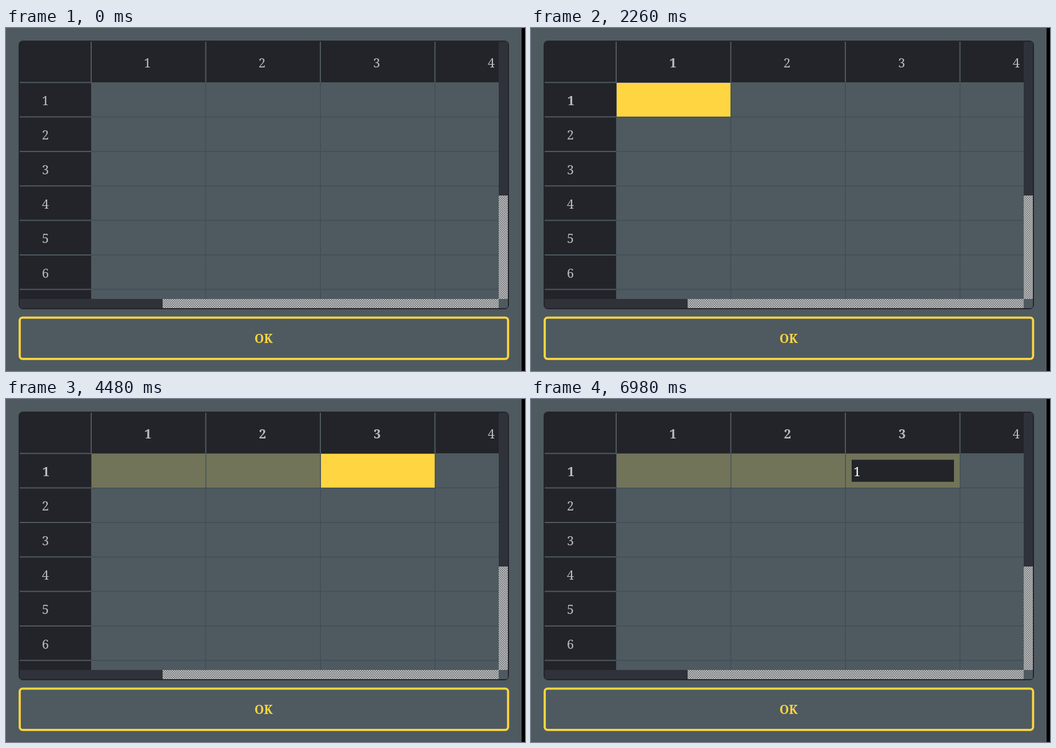
Recreate the animation shown at these times as an HTML page. Size 908 by 600 pixels, loop 8000 ms.

```html
<!DOCTYPE html>
<html lang="en">
<head>
<meta charset="utf-8">
<title>Table selection</title>
<style>
  html, body { margin: 0; width: 100%; height: 100%; overflow: hidden; background: #4e5a60; }
  svg { display: block; width: 908px; height: 600px; }

  .dark { fill: #232429; }
  .light { fill: #4e5a60; }
  .track { fill: #2f3239; }
  .grid { stroke: #435059; stroke-width: 2; }
  .rule { stroke: #4e5a60; stroke-width: 2; }
  text { font: 22px "Noto Serif", serif; text-anchor: middle; fill: #bcbdbe; }
  .ok { font-size: 21px; font-weight: 700; fill: #ffd541; }
  .typed, .caret { fill: #fff; }

  /* Every state change is a hard cut within the 8 s loop. */
  .anim { animation: 8s step-end infinite; }
  .cell { fill: transparent; }

  #col1 { animation-name: bold1; }
  #col2 { animation-name: bold2; }
  #col3 { animation-name: bold3; }
  #row1 { animation-name: boldUp; }
  #row2 { animation-name: boldDown; }
  #cell21 { animation-name: pickDown; }
  #cell11 { animation-name: pick1; }
  #cell12 { animation-name: pick2; }
  #cell13 { animation-name: pick3; }
  #editor { animation-name: open; }
  #caret { animation-name: caret; }
  #typed { animation-name: type; }

  @keyframes bold1 { 0% { font-weight: 400 } 14%, to { font-weight: 700; transform: translateX(1px) } }
  @keyframes bold2 { 0% { font-weight: 400 } 50.5%, to { font-weight: 700; transform: translateX(1px) } }
  @keyframes bold3 { 0% { font-weight: 400 } 53.25%, to { font-weight: 700; transform: translateX(1px) } }
  @keyframes boldUp { 0% { font-weight: 400 } 28.25%, to { font-weight: 700; transform: translateX(1px) } }
  @keyframes boldDown {
    0% { font-weight: 400; transform: none }
    14% { font-weight: 700; transform: translateX(1px) }
    28.25%, to { font-weight: 400; transform: none }
  }
  @keyframes pickDown { 0% { fill: transparent } 14% { fill: #ffd541 } 28.25%, to { fill: transparent } }
  @keyframes pick1 { 0% { fill: transparent } 28.25% { fill: #ffd541 } 50.5%, to { fill: #717459 } }
  @keyframes pick2 { 0% { fill: transparent } 50.5% { fill: #ffd541 } 53.25%, to { fill: #717459 } }
  @keyframes pick3 { 0% { fill: transparent } 53.25% { fill: #ffd541 } 68.5%, to { fill: #717459 } }
  @keyframes open { 0% { opacity: 0 } 68.5%, to { opacity: 1 } }
  @keyframes type { 0% { opacity: 0 } 75.5%, to { opacity: 1 } }
  @keyframes caret {
    0% { opacity: 1; transform: none }
    75.5% { opacity: 1; transform: translateX(12px) }
    87.25%, to { opacity: 0; transform: translateX(12px) }
  }
</style>
</head>
<body>
<svg viewBox="0 0 908 600">
  <defs>
    <pattern id="hatch" width="4" height="4" patternUnits="userSpaceOnUse"
             patternTransform="translate(272 472) scale(1.0025 1.005)">
      <path fill="#686b6e" d="M0 0h4v4H0z"/>
      <path fill="#d0d1d1" d="M0 0h2v2H0zM2 2h2v2H2z"/>
    </pattern>
    <clipPath id="view"><path d="M24 24H862V474H24z"/></clipPath>
  </defs>

  <rect class="light" width="908" height="600"/>
  <rect x="902" width="6" height="600"/>

  <rect class="dark" x="22" y="22" width="858" height="470" rx="8"/>
  <rect class="light" x="149" y="95" width="713" height="379"/>
  <g id="table" clip-path="url(#view)"></g>

  <path class="track" d="M862 24h16V474h-16zM24 474H862v16H28q-4 0-4-4z"/>
  <path class="light" d="M862 474h16v12q0 4-4 4h-12z"/>
  <path fill="url(#hatch)" d="M862 293h16V474h-16zM274 474H862v16H274z"/>

  <g id="editor" class="anim">
    <rect class="dark" x="561" y="106.3" width="179" height="38.5"/>
    <text id="typed" class="typed anim" x="570.5" y="135">1</text>
    <rect id="caret" class="caret anim" x="565" y="115" width="2" height="24"/>
  </g>

  <rect x="24" y="506.6" width="854.4" height="72.2" rx="5" fill="none" stroke="#ffd541" stroke-width="3.8"/>
  <text class="ok" x="450.7" y="550.5">OK</text>
</svg>
<script>
  const table = document.getElementById('table');
  const colX = i => 149 + 200.5 * i;
  const rowY = i => 95.2 + 60.35 * i;

  function add(name, attrs, content = '') {
    const el = document.createElementNS('http://www.w3.org/2000/svg', name);
    for (const key in attrs) el.setAttribute(key, attrs[key]);
    el.textContent = content;
    table.append(el);
  }
  const line = (kind, x1, y1, x2, y2) => add('line', { class: kind, x1, y1, x2, y2 });
  const label = (id, n, x, y) => add('text', { id: id + n, class: 'anim', x, y }, n);

  for (let i = 0; i < 7; i++) {
    if (i) line('grid', 149, rowY(i), 862, rowY(i));
    line('rule', 24, rowY(i), 149, rowY(i));
    if (i < 6) label('row', i + 1, 69, rowY(i) + 39.8);
  }
  for (let i = 0; i < 4; i++) {
    if (i) line('grid', colX(i), 95, colX(i), 474);
    line('rule', colX(i), 24, colX(i), 95);
    label('col', i + 1, colX(i) + 98.5, 69);
  }
  for (const [row, col] of [[2, 1], [1, 1], [1, 2], [1, 3]]) {
    add('rect', {
      id: `cell${row}${col}`, class: 'cell anim',
      x: colX(col - 1) + 1, y: rowY(row - 1) + 0.8, width: 199, height: 59
    });
  }
</script>
</body>
</html>
```
